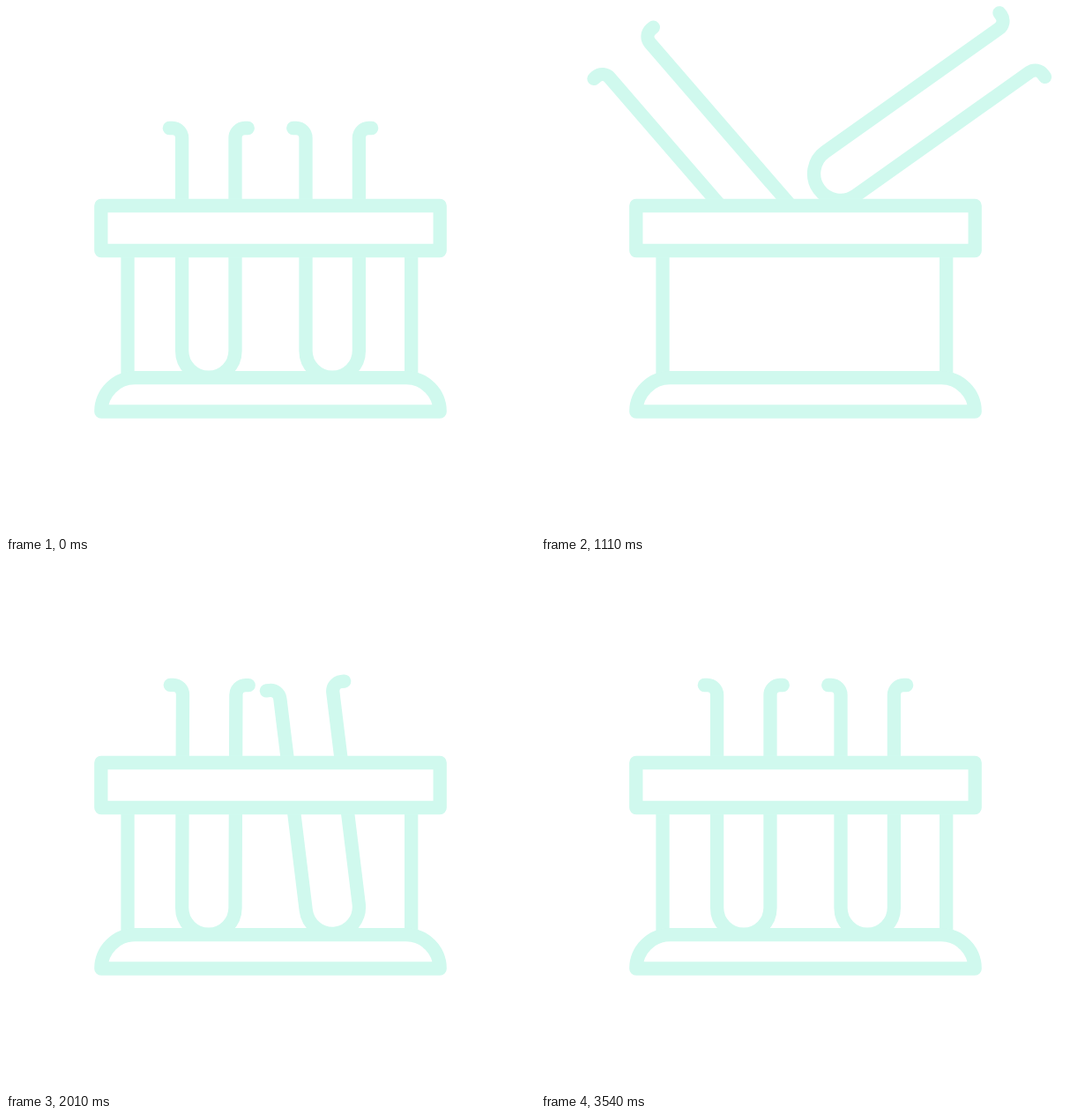
Recreate the animation shown at these times as an HTML page. Size 600 by 600 pixels, loop 3630 ms.

```html
<!DOCTYPE html>
<html lang="en">
<head>
<meta charset="utf-8">
<title>Test tube rack</title>
<style>
  html, body { margin: 0; height: 100%; overflow: hidden; background: #fff; }
  svg { display: block; width: 100vw; height: 100vh; }
</style>
</head>
<body>
<svg viewBox="0 0 600 600" fill="none" stroke="#d0f9ee" stroke-width="15.3" stroke-linecap="round" stroke-linejoin="round">
  <defs>
    <path id="tube" d="M-44.5-141.5H-41A11 11 0 0 1-30.2-130.5V111A30.2 30.2 0 0 0 30.2 111V-130.5A11 11 0 0 1 41-141.5H44.5"/>
  </defs>
  <path d="M138 278V421M459.7 278V421"/>
  <use href="#tube" id="left"/>
  <g transform="matrix(-1 0 0 1 600 0)"><use href="#tube" id="right"/></g>
  <path fill="#fff" d="M107.8 226.5H492.2V277.5H107.8Z"/>
  <path d="M107.8 460A38.5 38.5 0 0 1 146 421.7H454A38.5 38.5 0 0 1 492.2 460Z"/>
</svg>
<script>
const LOOP = 3630, STEP = 30;

// Cubic Bezier easing, solved by bisection
function bezier(x1, y1, x2, y2) {
  const at = (a, b, u) => 3 * a * u * (1 - u) ** 2 + 3 * b * u * u * (1 - u) + u ** 3;
  return x => {
    let lo = 0, hi = 1;
    for (let i = 0; i < 24; i++) {
      const mid = (lo + hi) / 2;
      if (at(x1, x2, mid) < x) lo = mid; else hi = mid;
    }
    return at(y1, y2, lo);
  };
}
const ease = bezier(0.25, 0.1, 0.25, 1);
const sine = x => (1 - Math.cos(Math.PI * x)) / 2;

// Poses: x, y, angle
const REST = [0, 0, 0], RAISED = [-60.5, -155, -55], TILTED = [13.5, 0, 7];

// Each move: start, end, pose to reach, easing
const moves = (rise, fall, settle) => [
  [...rise, RAISED, ease], [...fall, TILTED, sine], [...settle, REST, ease]
];
const tubes = {
  left: moves([70, 770], [888, 1588], [1588, 2128]),
  right: moves([90, 1230], [1366, 2016], [2016, 2596])
};

function poseAt(track, t) {
  let pose = REST;
  for (const [start, end, target, easing] of track) {
    if (t <= start) break;
    const k = easing(Math.min(1, (t - start) / (end - start)));
    pose = pose.map((v, i) => v + (target[i] - v) * k);
  }
  return pose;
}

function draw(now) {
  const t = Math.floor(now % LOOP / STEP) * STEP;
  for (const id in tubes) {
    const [x, y, angle] = poseAt(tubes[id], t);
    document.getElementById(id).setAttribute(
      'transform', `translate(${229.8 + x} ${280 + y}) rotate(${angle})`);
  }
  requestAnimationFrame(frame);
}

let origin;
function frame(now) {
  origin ??= now;
  draw(now - origin);
}
draw(0);
</script>
</body>
</html>
```
